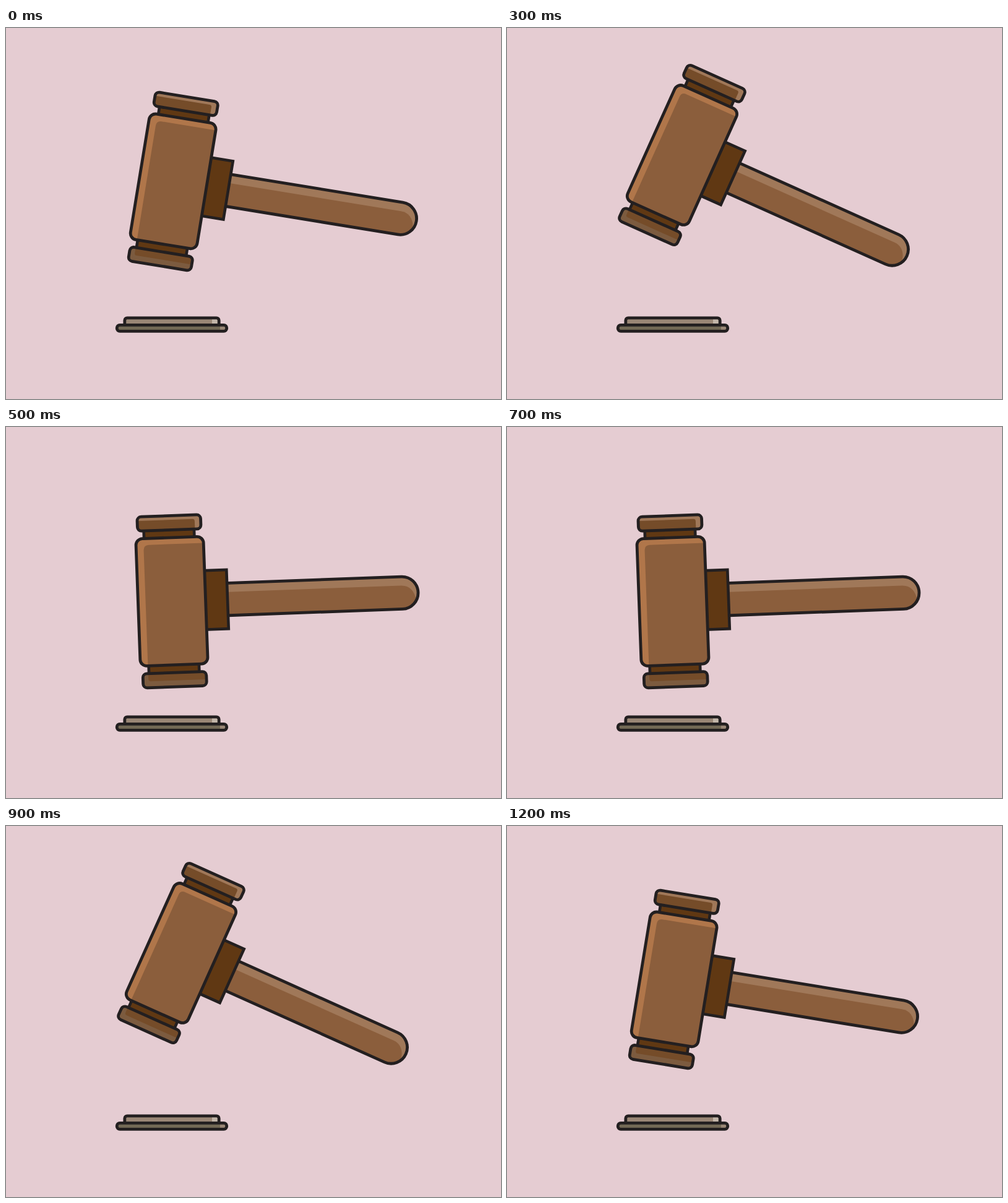
An HTML page for the animation above (1300 ms loop, 800 px wide and 600 px high).

```html
<!DOCTYPE html>
<html lang="en">
<head>
<meta charset="utf-8">
<title>Gavel</title>
<style>
  html, body { margin: 0; width: 100%; height: 100%; overflow: hidden; background: #e5ccd2; }
  svg { display: block; width: 100%; height: 100%; }
  .line { fill: none; stroke: #231f20; stroke-width: 4.8; }
  .deep { fill: #603813; stroke: #231f20; stroke-width: 4.6; }
</style>
</head>
<body>
<svg viewBox="0 0 800 600">
  <!-- sound block -->
  <rect x="191.8" y="468.8" width="152.4" height="16" rx="4" fill="#998675"/>
  <path d="M333 468.8H340.5Q344.2 468.8 344.2 473V481H333Z" fill="#c2b5a8"/>
  <rect class="line" x="191.8" y="468.8" width="152.4" height="16" rx="4"/>
  <rect x="179.2" y="480.4" width="177.5" height="10" rx="4.7" fill="#736955"/>
  <path d="M346 481H352Q356 481 356 485.5T352 490H346Z" fill="#998675"/>
  <rect class="line" x="179.2" y="480.4" width="177.5" height="10" rx="4.7"/>

  <!-- gavel, drawn level around its pivot -->
  <g id="gavel">
    <path d="M-85 -26.2H201A26.2 26.2 0 0 1 201 26.2H-85Z" fill="#a07859"/>
    <path d="M-85 -11.8H200C213 -11.8 222 -3 223.5 13A26.2 26.2 0 0 1 201 26.2H-85Z" fill="#8b5e3c"/>
    <path class="line" d="M-85 -26.2H201A26.2 26.2 0 0 1 201 26.2H-85Z"/>

    <rect class="deep" x="-118" y="-47.7" width="37" height="95.4"/>
    <rect class="deep" x="-212.3" y="-118" width="81.4" height="20"/>
    <rect class="deep" x="-212.3" y="98" width="81.4" height="20"/>

    <rect x="-225.7" y="-103" width="109.2" height="206" rx="10.5" fill="#b0764a"/>
    <path d="M-213.5 103V-84Q-213.5 -92.5 -205 -92.5H-116.5V93Q-116.5 103 -126.5 103Z" fill="#8b5e3c"/>
    <rect class="line" x="-225.7" y="-103" width="109.2" height="206" rx="10.5"/>

    <rect x="-222.3" y="-138.4" width="102.6" height="23" rx="6.5" fill="#a07859"/>
    <path d="M-222.3 -131.8H-133Q-129.5 -131.8 -129.5 -128.3V-115.4H-216Q-222.3 -115.4 -222.3 -122Z" fill="#754c29"/>
    <rect class="line" x="-222.3" y="-138.4" width="102.6" height="23" rx="6.5"/>

    <rect x="-222.3" y="115.4" width="102.6" height="23" rx="6.5" fill="#7c5b3f"/>
    <path d="M-213.5 115.4H-126Q-119.7 115.4 -119.7 122V128H-210Q-213.5 128 -213.5 124.5Z" fill="#754c29"/>
    <rect class="line" x="-222.3" y="115.4" width="102.6" height="23" rx="6.5"/>
  </g>
</svg>
<script>
  const STEP = 100;
  const LOOP = 1300;
  // Raise, then strike; the second half runs the same poses backwards.
  const ANGLES = [9.3, 25.6, 34.2, 24.2, 11.1, -2.1, -13.9];
  const gavel = document.getElementById('gavel');

  function draw(time) {
    const step = Math.floor((time % LOOP) / STEP);
    const pose = Math.min(step, 12 - step);
    gavel.setAttribute('transform', `translate(439 275.6) rotate(${ANGLES[pose]})`);
  }

  const start = performance.now();
  function tick() {
    draw(performance.now() - start);
    requestAnimationFrame(tick);
  }
  tick();
</script>
</body>
</html>
```
